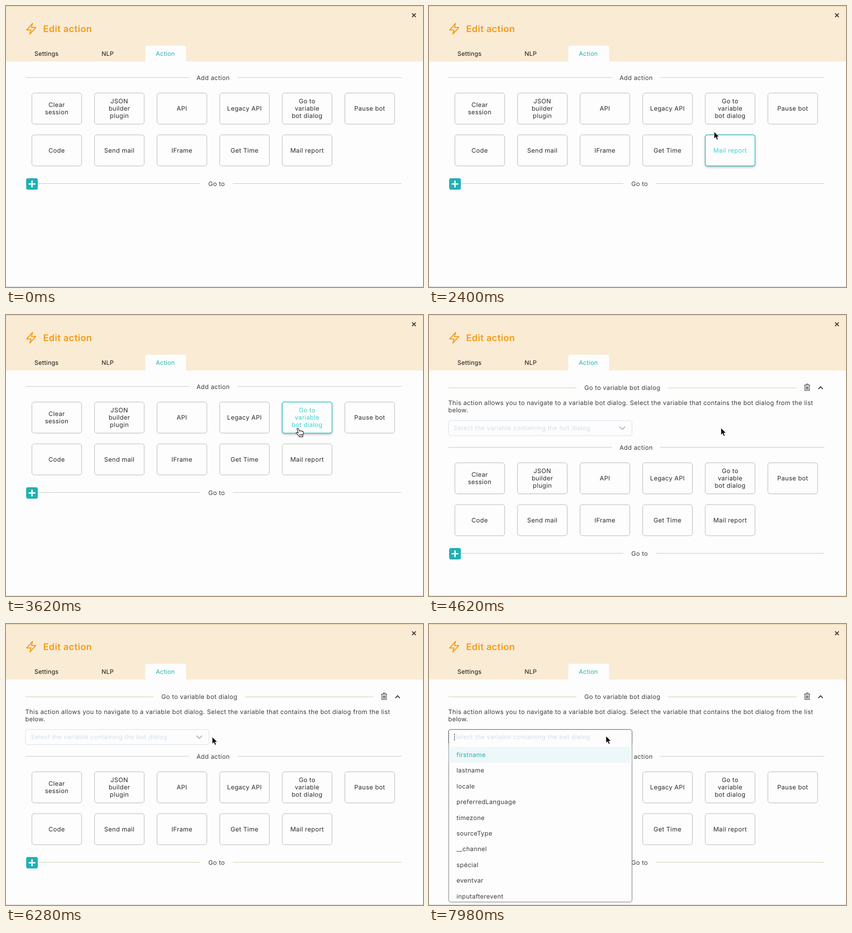
An HTML page that plays this animation: 910x615 px, repeating every 8000 ms.

```html
<!DOCTYPE html>
<html lang="en">
<head>
<meta charset="utf-8">
<title>Edit action</title>
<style>
  html, body { margin: 0; width: 100%; height: 100%; overflow: hidden; background: #fdfdfd; }
  svg { display: block; width: 910px; height: 615px; }
  text { font: 400 13.5px Inter, "Open Sans", sans-serif; letter-spacing: .4px; fill: #3c3c3c; text-rendering: geometricPrecision; }
  .mid { text-anchor: middle; }
  .title { font-size: 20px; font-weight: 600; letter-spacing: .45px; fill: #f59a14; }
  .tab { font-size: 13.2px; letter-spacing: .25px; fill: #111; }
  .tab.on, .pick { fill: #1fb0ac; }
  .hint { fill: #d3deea; }
  .icon { fill: none; stroke: #3c3c3c; stroke-linecap: round; stroke-linejoin: round; }
  .rule { stroke: #c4c4c4; }
  .olive { stroke: #c9ca9e; }
  .button rect { fill: #fdfdfd; stroke: #b2b2aa; }
  .button text { fill: #2a2a2a; }
  .hot rect { stroke: #2cc0c6; stroke-width: 1.4; filter: drop-shadow(0 2px 2.5px rgba(0, 0, 0, .28)); }
  .hot text { fill: #36d1cf; }

  /* Every timeline shares one 8 s loop. */
  .tools, .tools .rule, .button rect, .section, .hot, .box, .closed, .menu, .arrow, .hand
    { animation: 8s step-end infinite; }
  .tools { animation-name: drop; }
  .add { animation-name: add-tint !important; }
  .goto { animation-name: goto-tint !important; }
  .button:not(.hot) rect { animation-name: button-tint; }
  .section { animation-name: section; }
  .mail { animation-name: mail; }
  .variable { animation-name: variable; }
  .box { fill: #fdfdfd; stroke: #cfdde9; animation-name: box; }
  .closed { animation-name: closed; }
  .menu { animation-name: menu; }
  .arrow { animation-name: arrow; }
  .hand { animation-name: hand; }
  .cursor { animation: move 8s linear infinite; }

  @keyframes drop { 0% { transform: none } 56%, 100% { transform: translateY(133px) } }
  @keyframes add-tint { 56%, 100% { stroke: #c0c0d0 } }
  @keyframes goto-tint { 56%, 100% { stroke: #c9ca9e } }
  @keyframes button-tint { 56%, 100% { stroke: #b0b0ba } }
  @keyframes section { 0% { opacity: 0 } 56%, 100% { opacity: 1 } }
  @keyframes mail { 0% { opacity: 0 } 26.6% { opacity: 1 } 30.5%, 100% { opacity: 0 } }
  @keyframes variable { 0% { opacity: 0 } 31.5% { opacity: 1 } 56%, 100% { opacity: 0 } }
  @keyframes box { 79.5%, 100% { stroke: #6a6a6e } }
  @keyframes closed { 0% { opacity: 1 } 93.5%, 100% { opacity: 0 } }
  @keyframes menu { 0% { opacity: 0 } 93.5%, 100% { opacity: 1 } }
  @keyframes arrow {
    0% { opacity: 0 } 22.75% { opacity: 1 } 26.6% { opacity: 0 }
    29.7% { opacity: 1 } 31.75% { opacity: 0 } 56%, 100% { opacity: 1 }
  }
  @keyframes hand {
    0% { opacity: 0 } 26.6% { opacity: 1 } 29.7% { opacity: 0 }
    31.75% { opacity: 1 } 56%, 100% { opacity: 0 }
  }
  @keyframes move {
    0%, 22.75% { transform: translate(719px, 592px) }
    26.25% { transform: translate(670px, 390px) }
    30% { transform: translate(622px, 275px) }
    31.75% { transform: translate(628px, 255px) }
    43.5% { transform: translate(640px, 251px) }
    45.25%, 66.25% { transform: translate(637px, 247px) }
    73.75% { transform: translate(500px, 247px) }
    78.5% { transform: translate(450px, 247px) }
    83.75% { transform: translate(390px, 246px) }
    86% { transform: translate(387px, 245px) }
    100% { transform: translate(386px, 245px) }
  }
</style>
</head>
<body>
<svg viewBox="0 0 910 615">
  <rect width="910" height="615" fill="#fdfdfd"/>
  <rect width="910" height="121.5" fill="#faebd4"/>
  <path d="M0 .5H910" stroke="#dccb98"/>
  <path d="M0 614.5H910" stroke="#d0d0c8"/>

  <path class="icon" d="M58 38L45 52.5H54.5L52 61.5L65 47H55.5Z" style="stroke:#f59a14;stroke-width:2"/>
  <text class="title" x="81" y="56.5">Edit action</text>
  <path class="icon" d="M886.7 16.7l7 7m0-7l-7 7" stroke-width="2"/>
  <path d="M304 122V92q0-5 5-5H388q5 0 5 5V122Z" fill="#fdfdfd"/>
  <text class="tab" x="62" y="109">Settings</text>
  <text class="tab" x="208.5" y="109">NLP</text>
  <text class="tab on" x="327" y="109">Action</text>

  <g class="tools">
    <path class="rule add" d="M42.5 156.5H399M505 156.5H863"/>
    <text class="mid" x="452" y="161.5">Add action</text>
    <g id="buttons"></g>
    <rect x="44" y="377" width="25.5" height="25" rx="4" fill="#20b1b6"/>
    <path d="M50.5 389.5h12.5M56.75 383.2v12.6" stroke="#fff" stroke-width="3" stroke-linecap="round"/>
    <path class="rule goto" d="M71 388.5H424M495 388.5H863"/>
    <text class="mid" x="459.7" y="394">Go to</text>
  </g>

  <g class="section">
    <path class="olive" d="M42.5 159.5H322M522 159.5H802"/>
    <text class="mid" x="422" y="164">Go to variable bot dialog</text>
    <path class="icon" d="M819 153.5h12.5M823 153.2v-2h4.5v2M820.3 154v11.2h9.8V154M823.2 156.5v6M825.2 156.5v6M827.2 156.5v6" stroke-width="1.2"/>
    <path class="icon" d="M850.2 161.5l4.3-4.6l4.3 4.6" stroke-width="2"/>
    <text x="42" y="197">This action allows you to navigate to a variable bot dialog. Select the variable that contains the bot dialog from the list</text>
    <text x="42" y="213">below.</text>
    <rect class="box" x="42.5" y="231" width="400.5" height="33" rx="4.5"/>
    <path class="icon closed" d="M416.3 245l5.5 5.5l5.5-5.5" style="stroke:#c3c4c8;stroke-width:2.6"/>
    <g class="menu">
      <rect x="43" y="231" width="400" height="377.5" rx="4.5" fill="#fdfdfd" stroke="#66666a"/>
      <rect x="43.6" y="269" width="398.8" height="34.5" fill="#eef7f9"/>
      <path d="M55.5 240v15" stroke="#222"/>
      <g id="options"></g>
    </g>
    <text class="hint" x="54" y="252">Select the variable containing the bot dialog</text>
  </g>

  <g class="cursor">
    <path class="arrow" d="M0 0V15.6L3.6 12.3L6 18L8.9 16.8L6.5 11.3H11.2Z" fill="#0b0b0b" stroke="#fff" stroke-width="1"/>
    <path class="hand" d="M-1.7 3.2C-2.6.9.3 0 1.2 2L3.4 7.2C4 5.6 6 5.8 6.4 7.2C7.2 6 9 6.5 9.2 7.9C10.2 7 11.6 7.6 11.8 9.2C12.4 12 12 14 10.8 16V19.6H2.6V18C.6 15.8-1 14-3.4 12.1C-5 10.5-2.8 9.2-1.2 10.4L.8 11.6ZM4.2 13.5v3.5M6.7 13.5v3.5M9 13.3v3.5" fill="#fff" stroke="#111" stroke-width="1.2" stroke-linejoin="round"/>
  </g>
</svg>

<script>
  const labels = [
    "Clear|session", "JSON|builder|plugin", "API", "Legacy API", "Go to|variable|bot dialog", "Pause bot",
    "Code", "Send mail", "IFrame", "Get Time", "Mail report"
  ];
  const options = [
    "firstname", "lastname", "locale", "preferredLanguage", "timezone",
    "sourceType", "__channel", "spécial", "eventvar", "inputafterevent"
  ];

  function button(i, hot = "") {
    const x = 56.5 + 136.6 * (i % 6);
    const y = i < 6 ? 190.5 : 282;
    const lines = labels[i].split("|");
    const top = y + 38.5 - 8 * (lines.length - 1);
    const text = lines.map((line, n) =>
      `<text class="mid" x="${x + 54.2}" y="${top + 16 * n}">${line}</text>`).join("");
    return `<g class="button ${hot}"><rect x="${x}" y="${y}" width="108.5" height="68" rx="5"/>${text}</g>`;
  }

  document.getElementById("buttons").innerHTML =
    labels.map((_, i) => button(i)).join("") + button(4, "hot variable") + button(10, "hot mail");

  document.getElementById("options").innerHTML = options.map((name, i) =>
    `<text class="${i ? "" : "pick"}" x="60" y="${291 + 34.4 * i}">${name}</text>`).join("");
</script>
</body>
</html>
```
